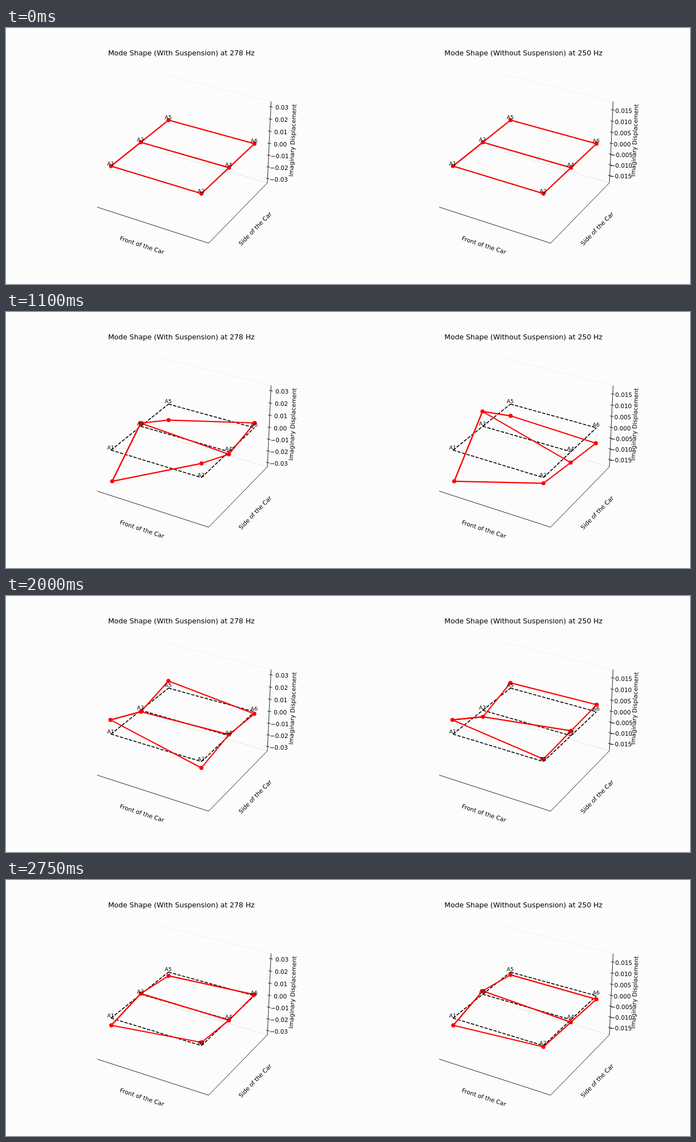
Write an HTML page with a canvas that moves like this. It is 1222x458 px and loops after 2.8 s.

```html
<!DOCTYPE html>
<html lang="en">
<head>
<meta charset="utf-8">
<title>Mode shapes</title>
<style>
html, body { margin: 0; width: 100%; height: 100%; overflow: hidden; background: #fcfcfc; }
canvas { display: block; }
</style>
</head>
<body>
<canvas id="stage" width="1222" height="458"></canvas>
<script>
const ctx = document.getElementById('stage').getContext('2d');
const STEP = 50, PERIOD = 28;

// Corners A1..A6 on the ground plane and the edges between them
const W = 0.4686, L = 0.509;
const corners = [[-W, -L], [W, -L], [-W, 0], [W, 0], [-W, L], [W, L]];
const edges = [[0, 1], [2, 3], [4, 5], [0, 2], [2, 4], [1, 3], [3, 5]];

// amp: peak height of each corner; tick: height between z ticks
const plots = [
  { x: 0, titleX: 313.2, title: 'Mode Shape (With Suspension) at 278 Hz',
    amp: [0.342, -0.148, -0.035, 0.0275, 0.1825, -0.0525], tick: 0.129, unit: 0.01, digits: 2 },
  { x: 611, titleX: 313.5, title: 'Mode Shape (Without Suspension) at 250 Hz',
    amp: [0.342, 0.0595, -0.163, 0.118, 0.134, 0.173], tick: 0.118, unit: 0.005, digits: 3 }
];

// Perspective view from azimuth -60, elevation 30, distance 10
function project([x, y], z = 0) {
  const u = 0.866 * x + 0.5 * y;
  const v = -0.25 * x + 0.433 * y + 0.866 * z;
  const depth = 0.433 * x - 0.75 * y + 0.5 * z;
  const scale = 194 / (1 - depth / 10);
  return [318 + u * scale, 226.7 - v * scale];
}

function line(a, b, color, width) {
  ctx.strokeStyle = color;
  ctx.lineWidth = width;
  ctx.beginPath();
  ctx.moveTo(...a);
  ctx.lineTo(...b);
  ctx.stroke();
}

// Text centred on (x, y), turned by an angle in degrees
function label(str, x, y, size = 10.6, angle = 0) {
  ctx.save();
  ctx.translate(x, y);
  ctx.rotate(angle * Math.PI / 180);
  ctx.font = `${size}px "DejaVu Sans", sans-serif`;
  ctx.textAlign = 'center';
  ctx.fillStyle = '#000';
  ctx.fillText(str, 0, size * 0.36);
  ctx.restore();
}

function drawAxes(p) {
  line([278, 82.5], [473.6, 131.5], '#eeeeee', 0.9);
  line([279, 222], [467, 277], '#e4e4e4', 0.9);
  line([279, 122], [279, 130], '#efefef', 0.9);
  line([280, 188], [280, 195], '#f2f2f2', 0.9);

  line([163, 320.5], [362, 385], '#000', 0.85);
  line([362, 385], [467, 277], '#000', 0.85);
  line([467, 277], [473.6, 131.5], '#000', 0.85);

  for (let i = -3; i <= 3; i++) {
    const [x, y] = project([0.585, 0.585], i * p.tick);
    line([x - 3, y - 0.7], [x + 3.5, y + 0.8], '#000', 0.85);
    const text = (i < 0 ? '\u2212' : '') + Math.abs(i * p.unit).toFixed(p.digits);
    label(text, x + 19.8, y + 1.6);
  }
  label(p.title, p.titleX, 44.6, 12.64);
  label('Front of the Car', 243, 388.5, 10.6, 18);
  label('Side of the Car', 445, 359, 10.6, -45.8);
  label('Imaginary Displacement', 512, 201, 10.6, -87.4);
}

function drawShape(p, s) {
  const rest = corners.map(c => project(c));
  const pts = corners.map((c, i) => project(c, p.amp[i] * s));

  ctx.setLineDash([5.9, 2.5]);
  for (const [a, b] of edges) line(rest[a], rest[b], '#000', 1.6);
  ctx.setLineDash([]);

  for (const [a, b] of edges) line(pts[a], pts[b], '#f00', 2.15);
  line(pts[0], pts[2], '#f00', 2.15);
  ctx.fillStyle = '#f00';
  for (const [x, y] of pts) {
    ctx.beginPath();
    ctx.arc(x, y, 3.7, 0, 2 * Math.PI);
    ctx.fill();
  }
  rest.forEach(([x, y], i) => label('A' + (i + 1), x - 0.6, y - 5, 9.5));
}

function draw(now) {
  const step = Math.floor(now / STEP) % PERIOD;
  const s = Math.sin(2 * Math.PI * step / PERIOD);
  ctx.fillStyle = '#fcfcfc';
  ctx.fillRect(0, 0, 1222, 458);
  for (const p of plots) {
    ctx.save();
    ctx.translate(p.x, 0);
    drawAxes(p);
    drawShape(p, s);
    ctx.restore();
  }
}

const start = performance.now();
function loop() {
  draw(performance.now() - start);
  requestAnimationFrame(loop);
}
loop();
</script>
</body>
</html>
```
